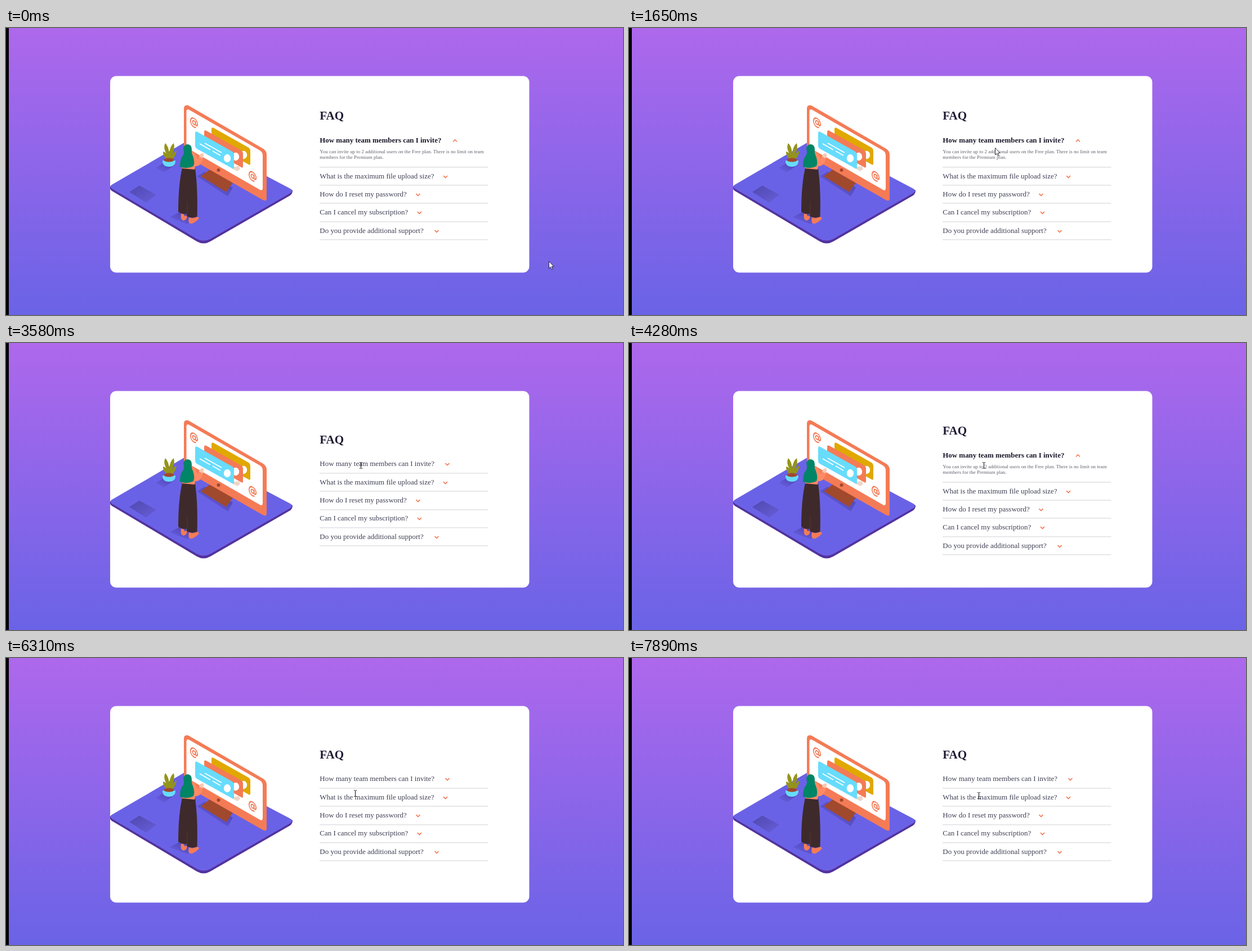
An HTML page that plays this animation: 1096 px wide and 511 px high, repeating every 8 s.

```html
<!DOCTYPE html>
<html lang="en">
<head>
<meta charset="utf-8">
<title>FAQ accordion</title>
<style>
  html, body { margin: 0; width: 100%; height: 100%; overflow: hidden; }
  svg { display: block; width: 1096px; height: 511px; }
  text { font-family: "Liberation Serif", "Times New Roman", serif; }
  .heading { font-size: 21px; font-weight: bold; fill: #1d1a33; }
  .question { font-size: 12.97px; fill: #3f4054; }
  .question.open { font-size: 12.93px; font-weight: bold; fill: #1a1829; }
  .answer { font-size: 8.93px; fill: #62626f; }
  .chevron { fill: none; stroke: #f47b56; stroke-width: 1.7; }
</style>
</head>
<body>
<svg viewBox="0 0 1096 511">
  <defs>
    <linearGradient id="sky" x2="0" y2="1"><stop stop-color="#ae68ec"/><stop offset="1" stop-color="#6a63e6"/></linearGradient>
    <linearGradient id="shade" x1="0" y1="1" x2="1" y2="0"><stop stop-color="#6a62e6"/><stop offset="1" stop-color="#493fa6"/></linearGradient>
    <linearGradient id="tile" x2="1" y2="1"><stop stop-color="#5048ae"/><stop offset="1" stop-color="#665ed8"/></linearGradient>
    <g id="at" fill="none" stroke="#f47b56" stroke-width="2">
      <circle r="3"/>
      <path d="M3 -3.500 V1.500 Q3.300 3.500 5 3 Q7.200 2 7.200 -.500 A7.200 7.200 0 1 0 4 6.200"/>
    </g>
  </defs>
  <rect width="1096" height="511" fill="url(#sky)"/>
  <rect width="5" height="511"/>
  <rect x="185" y="85.500" width="744.500" height="350" rx="11" fill="#fff"/>

  <!-- floor -->
  <path fill="#53329c" d="M185 282 V286 Q185 288 188 290 L339 380 Q351 387 363 380 L505 298 Q509 295 509 289 L345 200Z"/>
  <path fill="#6a62e6" d="M188 279 L334 194 Q345 188 356 206 L463 264 L505 286 Q511 290 505 294 L363 375.500 Q351 382 339 375.500 L188 286 Q183 282 188 279Z"/>
  <path fill="url(#tile)" d="M219 292 L237 280.500 L267 297 L249 311Z"/>
  <path fill="url(#shade)" d="M266 249 L284 238 L300 244 L280 257Z"/>
  <path fill="url(#shade)" d="M339 264 L353 256 L403 284 L394 300Z"/>
  <path fill="url(#shade)" d="M291 337 L309 327 L338 340 L322 349Z"/>

  <!-- plant -->
  <path fill="#94941a" d="M286 235 Q278 226 279 220 Q283 220 287 227 Q278 214 283 205 Q289 211 290 224 Q291 210 298 205 Q301 215 294 227 Q299 219 303 219 Q301 230 293 236Z"/>
  <path fill="#67dcfc" d="M278 236 Q278 247 289.500 247 Q301 247 301 236Z"/>
  <ellipse cx="289.500" cy="235" rx="9" ry="3.600" fill="#a0492d"/>

  <!-- monitor -->
  <path fill="#a0492d" d="M346 264 L363 251 L404 274 L391 292Z"/>
  <path fill="#f47b56" d="M316 144 Q316 136 324 138 L457 215 Q463 219 463 226 L463 303 Q463 310 456 306 L321 229 Q316 226 316 220Z"/>
  <path fill="#fff" d="M320.500 149 Q320.500 143 326 146 L451 218 Q456 221 456 227 L456 284 Q456 291 451 288 L320.500 213Z"/>
  <circle cx="377.500" cy="253" r="3" fill="#a0492d"/>
  <use href="#at" transform="matrix(.87 .45 0 1.080 334 168.500)"/>
  <use href="#at" transform="matrix(.87 .45 0 1.080 438 264)"/>
  <path fill="#ecd6c8" d="M398 248 L414 246 L416 251 L411 255Z"/>
  <g id="panels"></g>
  <path d="M353 205 L383 222 M344 206 L363 217 M367 219 L381 227" stroke="#fff" stroke-width="1.700"/>

  <!-- visitor -->
  <path fill="#3e2a2b" d="M313 249 L336 250 Q341 286 339.500 336 Q331 340 321 335 L321 331 Q312 332 306 327 Q306 280 313 249Z"/>
  <path d="M322 309 V334" stroke="#5e3934" stroke-width=".8"/>
  <path fill="#f47b56" d="M311 330.500 L316 331.500 L317 335 L321 334 Q323 341 315 343 Q309 341 311 330.500Z M325 337 L331 338.500 L336 337.500 Q342 335 343 339 Q338 345 331 348 Q322 350 325 337Z"/>
  <path fill="#ff8a65" d="M328 220 Q336 219 340 234 L344 227 L350 231 Q347 247 336 246 L335 252 L313 250 L312 244Z"/>
  <path fill="#f9c9b2" d="M343 229 Q344 223 350 223 Q353 227 349 232Z"/>
  <path fill="#008566" d="M315 215 Q316 207 323 207 Q330 208 330 216 Q329 222 332 228 Q336 239 333 246 Q322 252 309 247 Q309 232 315 226 Q317 221 315 215Z"/>

  <g id="faq"></g>
  <g id="arrow"><path d="M.500 .500 V13 L3.300 10.400 L5.200 14.800 L7.200 14 L5.300 9.700 L9 9.500Z" fill="#fff" stroke="#16161c" stroke-width=".9"/></g>
  <g id="beam"><path d="M0 -4.500 H1.800 M3.200 -4.500 H5 M2.500 -4 V6 M0 6.500 H1.800 M3.200 6.500 H5" fill="none" stroke="#16161c" stroke-width="1.100"/></g>
  <circle id="click" r="9.800" fill="#ff0" fill-opacity=".47"/>
</svg>

<script>
const LOOP = 8000;
const byId = id => document.getElementById(id);

const items = [
  { q: 'How many team members can I invite?', down: 784, up: 797.5,
    a: ['You can invite up to 2 additional users on the Free plan. There is no limit on team', 'members for the Premium plan.'] },
  { q: 'What is the maximum file upload size?', down: 780.5, up: 792,
    a: ['No more than 2GB. All files in your account must fit your allotted storage space.'] },
  { q: 'How do I reset my password?', down: 732 },
  { q: 'Can I cancel my subscription?', down: 734.5 },
  { q: 'Do you provide additional support?', down: 765 },
];

// press time, time the list responds, item open afterwards (-1: none)
const clicks = [
  [2420, 2650, -1], [4050, 4280, 0], [5380, 5620, -1], [6540, 6770, 1], [7720, 7890, -1],
];

// first step, last step, number of steps, end x, end y, pointer
const moves = [
  [0, 0, 1, 964, 415, 'arrow'],
  [70, 70, 1, 963, 415, 'arrow'],
  [460, 630, 4, 872, 348, 'arrow'],
  [970, 1170, 4, 713, 255, 'arrow'],
  [1490, 1570, 2, 656, 210, 'arrow'],
  [1650, 1650, 1, 650, 213, 'arrow'],
  [2020, 2100, 2, 635, 203, 'beam'],
  [2740, 2740, 1, 635, 203, 'arrow'],
  [3220, 3580, 6, 628, 217, 'beam'],
  [5010, 5010, 1, 623, 208, 'arrow'],
  [5070, 5070, 1, 621, 206, 'arrow'],
  [5850, 6080, 4, 619, 239, 'arrow'],
  [6160, 6310, 3, 617.5, 240, 'beam'],
  [7100, 7260, 3, 619, 247, 'arrow'],
  [7330, 7410, 2, 618.5, 244, 'beam'],
];

function drawPanels() {
  const panel = (x, y, color, dotX, dotY) =>
    `<path fill="${color}" d="M${x} ${y + 3} q0 -4 4 -2 l62 35 q3 2 3 5 v23 q0 4 -3 2 l-63 -35 q-3 -2 -3 -5z"/>
     <ellipse cx="${dotX}" cy="${dotY}" rx="6.2" ry="7.2" fill="#fff"/>`;
  byId('panels').innerHTML = panel(365, 177, '#e0a800', 422, 226)
    + panel(352, 182, '#f47b56', 408, 229) + panel(336, 184, '#67dcfc', 393, 232);
}

function drawFaq(open) {
  const lines = open < 0 ? 0 : items[open].a.length;
  const extra = lines ? 11 + 10.3 * lines : 0;
  const text = (cls, y, str) => `<text class="${cls}" x="557.300" y="${Math.round(y)}">${str}</text>`;
  let base = 219.4 - extra / 2;
  let out = text('heading', base - 40.6, 'FAQ');
  items.forEach((item, i) => {
    const isOpen = i === open;
    out += text(isOpen ? 'question open' : 'question', base, item.q);
    out += `<path class="chevron" d="M-3.500 -1.700 L0 1.800 L3.500 -1.700" transform="translate(${
      isOpen ? item.up : item.down} ${Math.round(base) - 3.2}) scale(1 ${isOpen ? -1 : 1})"/>`;
    if (isOpen) {
      item.a.forEach((str, n) => out += text('answer', base + 19.4 + 10.3 * n, str));
      base += extra;
    }
    out += `<rect x="557" y="${Math.round(base + 11.4)}" width="299.500" height="1.700" fill="#e4e4e7"/>`;
    base += 32.35;
  });
  byId('faq').innerHTML = out;
}

function pointerAt(t) {
  let x = 964, y = 415, shape = 'arrow';
  for (const [start, end, steps, toX, toY, kind] of moves) {
    if (t < start) break;
    const gap = (end - start) / (steps - 1 || 1) || 1;
    const k = Math.min(steps, Math.floor((t - start) / gap + 1e-6) + 1) / steps;
    x += (toX - x) * k;
    y += (toY - y) * k;
    shape = kind;
  }
  return { x: Math.round(x), y: Math.round(y), shape };
}

let shown;
function render(now) {
  const t = now % LOOP;
  const open = clicks.reduce((state, [, respond, next]) => t >= respond ? next : state, 0);
  if (open !== shown) drawFaq(shown = open);

  const { x, y, shape } = pointerAt(t);
  const pressed = clicks.some(([press, respond]) => t >= press && t < respond);
  const show = (id, visible) => {
    byId(id).setAttribute('transform', `translate(${x} ${y})`);
    byId(id).style.display = visible ? '' : 'none';
  };
  show('arrow', shape === 'arrow');
  show('beam', shape === 'beam');
  show('click', pressed);
}

drawPanels();
const began = performance.now();
function tick() {
  render(performance.now() - began);
  requestAnimationFrame(tick);
}
tick();
</script>
</body>
</html>
```
